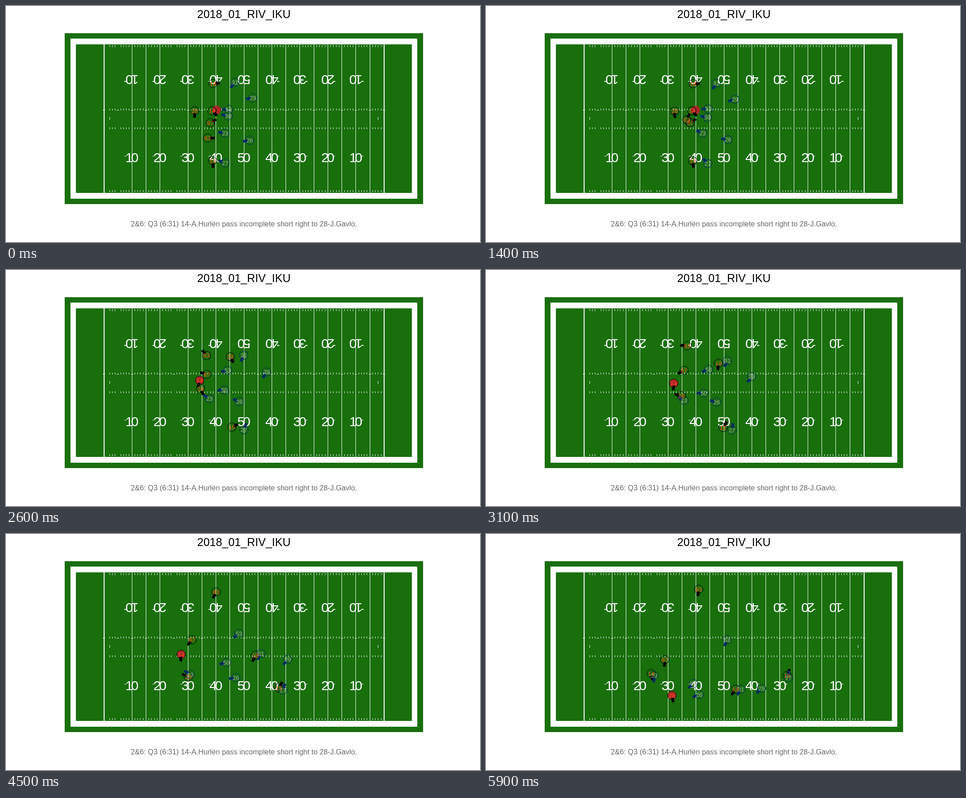
Recreate the animation shown at these times as an HTML page. Size 1058 px wide and 529 px high, loop 6 s.

```html
<!DOCTYPE html>
<html lang="en">
<head>
<meta charset="utf-8">
<title>Play</title>
<style>
html, body { margin: 0; width: 100%; height: 100%; overflow: hidden; background: #fff; }
svg { display: block; width: 100vw; height: 100vh; font-family: "Liberation Sans", Arial, sans-serif; text-anchor: middle; }
line, rect, .ring { shape-rendering: crispEdges; }
</style>
</head>
<body>
<svg viewBox="0 0 1058 529">
  <text x="531" y="26.5" font-size="25">2018_01_RIV_IKU</text>
  <g id="turf"></g>
  <g id="marks" stroke="#fff"></g>
  <g id="digits" fill="#fff" font-size="30.3"></g>
  <circle id="ball" r="10" fill="#ad282a"/>
  <g id="rings"></g>
  <g id="bars"></g>
  <g id="labels" font-size="13"></g>
  <text x="531" y="494" font-size="16.35" fill="#666">2&amp;6: Q3 (6:31) 14-A.Hurlen pass incomplete short right to 28-J.Gavlo.</text>
</svg>
<script>
const $ = id => document.getElementById(id);
const clamp = v => Math.min(1, Math.max(0, v));
const mix = (a, b, k) => a.map((v, i) => v + (b[i] - v) * k);

function add(parent, tag, attrs, text) {
  const el = document.createElementNS('http://www.w3.org/2000/svg', tag);
  for (const k in attrs) el.setAttribute(k, attrs[k]);
  if (text) el.textContent = text;
  return parent.appendChild(el);
}

// Field, centred on the 50 yard line
const CX = 531, CY = 252.5, YARD = 6.245;
const yardX = n => CX + (n - 50) * YARD;
const pixelX = n => Math.floor(yardX(n)) + .5;
const line = (x1, y1, x2, y2, w = 1) =>
  add($('marks'), 'line', { x1, y1, x2, y2, 'stroke-width': w });

for (const border of [4, 2, 0]) {
  const w = (60 + border) * YARD, h = (80 / 3 + border) * YARD;
  add($('turf'), 'rect', { x: CX - w, y: CY - h, width: 2 * w, height: 2 * h,
    fill: border == 2 ? '#fff' : '#196f0c' });
}

for (let n = 0; n <= 100; n++) {
  const x = pixelX(n);
  if (n % 5 == 0) {
    if (n != 5 && n != 25) line(x, 86, x, 419, n % 100 ? 1 : 2);
    line(x - 2.5, 233.5, x + 2.5, 233.5);
  } else if (n > 1) {
    for (const y of [88, 230, 272, 413]) line(x, y, x, y + 4);
  }
  if (n == 2 || n == 98) line(x, 249, x, 255);
}

// Yard numbers, upright below and upside down above
for (const turn of [0, 180]) {
  const g = add($('digits'), 'g', { transform: `rotate(${turn} ${CX} ${CY})` });
  for (let n = 10; n <= 90; n += 10) {
    const x = yardX(n), side = Math.sign(n - 50);
    const put = (dx, s) => add(g, 'text', { x: x + dx, y: 350 }, s);
    put(-YARD, String(Math.min(n, 100 - n) / 10));
    put(YARD, '0');
    if (side) add(g, 'rect', { x: x + side * 14.5 - 2.5, y: 335.5, width: 5, height: 1.5 });
  }
}

// Players stand until their start, then run smoothly through three points
const MARKS = [3100, 4500, 5900];
const SNAP = 1300, READ = 800, THROW = 4900, CATCH = 5650;
const AWAY = { ink: '#000', color: '#fb4f14' };
const HOME = { ink: '#002c5f', color: '#a2aaad' };

function player(team, num, start, stance, ...pts) {
  const times = [start, ...MARKS], a = stance * Math.PI / 180;
  const slope = (k, c) => {
    if (!k) return 0;
    const j = Math.min(k + 1, 3);
    return (pts[j][c] - pts[k - 1][c]) / (times[j] - times[k - 1]);
  };
  return {
    start,
    stance: [Math.cos(a), Math.sin(a)],
    at(t) {
      const i = t < times[1] ? 0 : t < times[2] ? 1 : 2;
      const span = times[i + 1] - times[i], u = clamp((t - times[i]) / span);
      return pts[i].map((p, c) => {
        const d = pts[i + 1][c] - p;
        const m = slope(i, c) * span, n = slope(i + 1, c) * span;
        return p + u * (m + u * (3 * d - 2 * m - n + u * (m + n - 2 * d)));
      });
    },
    still: [
      add($('rings'), 'circle', { class: 'ring', r: 9.5, fill: 'none', stroke: team.ink }),
      add($('labels'), 'text', { y: 4.7, fill: team.color }, num)
    ],
    bar: add($('bars'), 'rect', { x: 5, y: -3, width: 10.5, height: 6, fill: team.ink })
  };
}

const passer = player(AWAY, '14', SNAP, 45, [460, 235], [419, 254], [391, 270], [369, 313]);
const catcher = player(AWAY, '28', SNAP, 92, [421, 235], [436, 282], [407, 320], [415, 362]);
const players = [
  passer, catcher,
  player(AWAY, '87', SNAP, -32, [456, 262], [442, 225], [415, 237], [399, 282]),
  player(AWAY, '83', 0, 0, [450, 296], [449, 170], [469, 130], [475, 124]),
  player(AWAY, '18', SNAP, -6, [462, 174], [519, 209], [557, 272], [557, 348]),
  player(AWAY, '15', SNAP, 84, [461, 347], [529, 353], [609, 345], [672, 317]),
  player(HOME, '31', READ, 128, [511, 171], [539, 203], [569, 268], [569, 348]),
  player(HOME, '29', READ, 171, [551, 206], [593, 239], [629, 281], [615, 346]),
  player(HOME, '53', READ, 180, [497, 232], [497, 223], [520, 223], [538, 237]),
  player(HOME, '50', READ, 190, [496, 246], [486, 276], [492, 288], [463, 335]),
  player(HOME, '23', READ, 188, [489, 285], [442, 292], [411, 315], [375, 317]),
  player(HOME, '26', READ, 170, [544, 301], [515, 296], [513, 322], [476, 360]),
  player(HOME, '27', READ, 203, [489, 352], [549, 359], [618, 350], [675, 322])
];

// Snapped to the passer, then thrown to the catcher
function ballAt(t) {
  if (t < THROW) return mix([470, 233], passer.at(t), clamp((t - SNAP) / 400));
  return mix(passer.at(THROW), catcher.at(t), clamp((t - THROW) / (CATCH - THROW)));
}

// Turn from the stance towards the ball, leaning into the run
function facing(p, pos, aim, t) {
  const before = p.at(t - 100);
  const to = aim.map((v, c) => v - pos[c]);
  const reach = Math.max(20, Math.hypot(...to));
  const look = to.map((v, c) => v / reach + (pos[c] - before[c]) / 4);
  const [x, y] = mix(p.stance, look, clamp((t - p.start) / 1800));
  return Math.atan2(y, x) * 180 / Math.PI;
}

function draw(now) {
  const t = Math.floor(now / 100) * 100 % 6000;
  const ball = ballAt(t);
  $('ball').setAttribute('transform', `translate(${ball})`);
  for (const p of players) {
    const pos = p.at(t), move = `translate(${pos})`;
    const turn = facing(p, pos, p == passer ? catcher.at(t) : ball, t);
    for (const el of p.still) el.setAttribute('transform', move);
    p.bar.setAttribute('transform', `${move} rotate(${turn})`);
  }
  requestAnimationFrame(draw);
}
draw(0);
</script>
</body>
</html>
```
